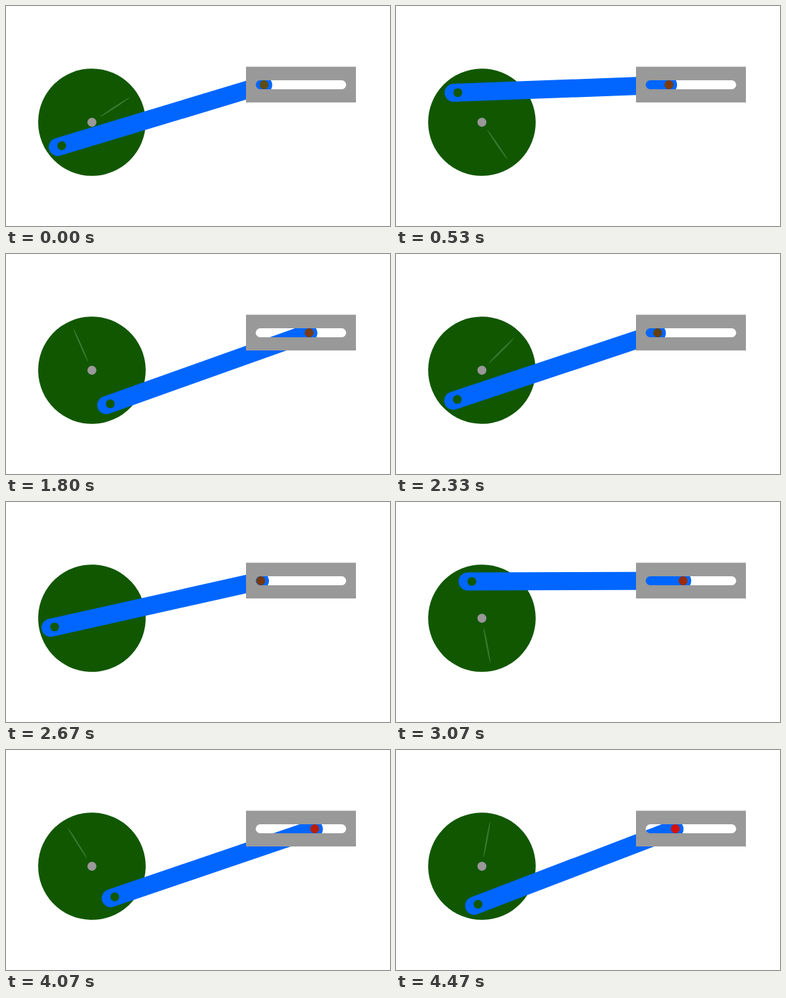
An HTML page that plays this animation: 552 by 317 pixels, repeating every 4540 ms.

```html
<!DOCTYPE html>
<html lang="en">
<head>
<meta charset="utf-8">
<title>Slider crank</title>
<style>
  html, body { margin: 0; width: 100%; height: 100%; overflow: hidden; background: #fff; }
  svg { display: block; width: 100vw; height: 100vh; }
</style>
</head>
<body>
<svg viewBox="0 0 552 317">
  <g id="wheel">
    <circle r="77.3" fill="#115700"/>
    <ellipse id="mark" cx="39.5" rx="26" ry="1.1" fill="#397a33"/>
  </g>
  <circle cx="123.5" cy="167.5" r="6.5" fill="#999"/>
  <line id="rod" stroke="#06f" stroke-width="26" stroke-linecap="round"/>
  <circle id="crankPin" r="6.3" fill="#115700"/>
  <path fill="#999" fill-rule="evenodd"
    d="M345 87.5H503V139H345ZM365.5 107H482.5a6.5 6.5 0 0 1 0 13H365.5a6.5 6.5 0 0 1 0-13Z"/>
  <circle id="slidePin" r="6.4"/>
</svg>
<script>
const LOOP = 4540, FRAMES = 68, FPS = 15;
const HUB = { x: 123.5, y: 167.5 }, CRANK = 55, ROD = 303.7, SLIDE_Y = 113.5;
const RAD = Math.PI / 180;

// step, crank angle in degrees, slide pin colour
const POSES = [
  [0, 142, [92, 76, 22]],
  [14, 329, [156, 44, 8]],
  [22, 421.4, [122, 60, 16]],
  [29, 490.2, [98, 64, 16]],
  [38, 614.7, [156, 42, 6]],
  [44, 700.7, [142, 48, 14]],
  [54, 815.8, [214, 18, 4]]
];

const el = id => document.getElementById(id);
const wheel = el('wheel'), rod = el('rod');
const crankPin = el('crankPin'), slidePin = el('slidePin');

function set(node, attrs) {
  for (const name in attrs) node.setAttribute(name, attrs[name]);
}

// The machine pauses briefly in a rhythm that repeats every second.
const pauses = i => i === 67 || (i > 2 && [2, 8, 9].includes(i % 15));
const startOf = i => Math.round(i * 100 / FPS) * 10;

function stepAt(ms) {
  let step = 0;
  for (let i = 1; i < FRAMES && startOf(i) <= ms; i++) {
    if (!pauses(i)) step++;
  }
  return step;
}

// The crank turns slower at the bottom than at the top.
const speed = deg => 12.4 - 2.3 * Math.sin(deg * RAD);

function poseAt(step) {
  let k = 0;
  while (k < POSES.length - 2 && step >= POSES[k + 1][0]) k++;
  const [s0, a0, c0] = POSES[k], [s1, a1, c1] = POSES[k + 1];
  const span = s1 - s0, u = (step - s0) / span, v = 1 - u;
  const angle = a0 * v * v * (1 + 2 * u) + a1 * u * u * (3 - 2 * u)
    + span * u * v * (speed(a0) * v - speed(a1) * u);
  const color = c0.map((c, i) => Math.round(c * v + c1[i] * u));
  return { angle, color };
}

function draw(ms) {
  const { angle, color } = poseAt(stepAt(ms));
  const x = HUB.x + CRANK * Math.cos(angle * RAD);
  const y = HUB.y + CRANK * Math.sin(angle * RAD);
  const dy = SLIDE_Y - y, dx = Math.sqrt(ROD * ROD - dy * dy);
  const ux = dx / ROD, uy = dy / ROD, slideX = x + dx;

  set(wheel, { transform: `translate(${HUB.x} ${HUB.y}) rotate(${angle - 175.4})` });
  set(rod, { x1: x - 6 * ux, y1: y - 6 * uy, x2: slideX - 1.3 * ux, y2: SLIDE_Y - 1.3 * uy });
  set(crankPin, { cx: x, cy: y });
  set(slidePin, { cx: slideX, cy: SLIDE_Y, fill: `rgb(${color})` });
}

const begin = performance.now();
function tick() {
  draw((performance.now() - begin) % LOOP);
  requestAnimationFrame(tick);
}
tick();
</script>
</body>
</html>
```
